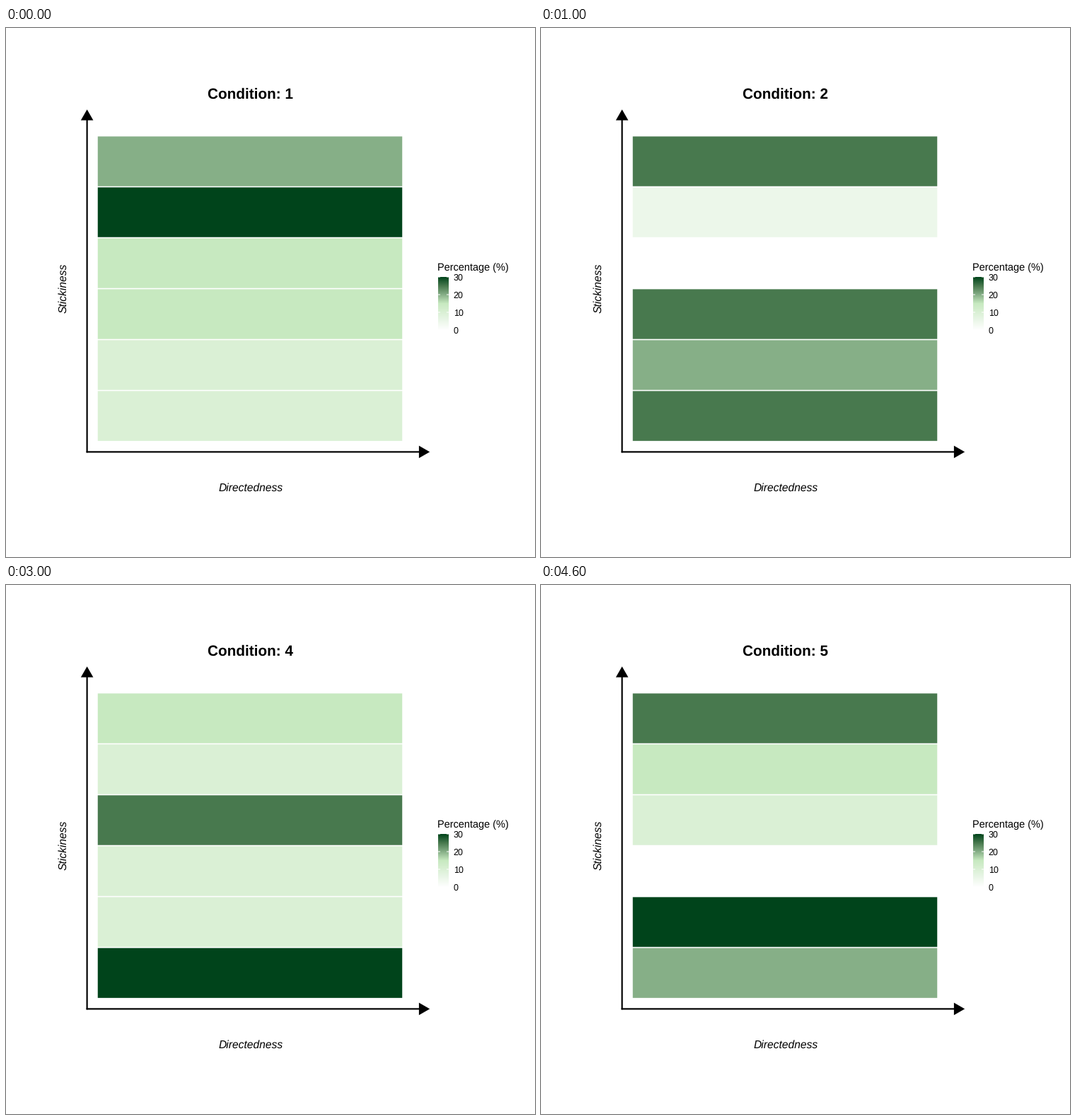
Write a matplotlib script that moves like this. It is 748 px wide and 748 px high and loops after 5000 ms.

```python
import matplotlib.pyplot as plt
import numpy as np
from matplotlib.animation import FuncAnimation
from matplotlib.colors import LinearSegmentedColormap
from matplotlib.patches import Polygon, Rectangle

SIZE, DPI = 748, 100
PX = 72 / DPI  # points per pixel

# Percentage per stickiness level, top to bottom, one row per condition
CONDITIONS = [
    [20, 30, 15, 15, 10, 10],
    [25, 5, 0, 25, 20, 25],
    [20, 0, 15, 15, 20, 30],
    [15, 10, 25, 10, 10, 30],
    [25, 15, 10, 0, 30, 20],
]
GREENS = LinearSegmentedColormap.from_list(
    "greens",
    ["#ffffff", "#ecf7ea", "#daf0d5", "#c7e9c0", "#86af87", "#48794e", "#00441b"],
    N=601,
)
LEFT, TOP, WIDTH, STEP = 129, 152.6, 432, 72

plt.rcParams["font.family"] = "Liberation Sans"
plt.rcParams["text.hinting"] = "none"

fig = plt.figure(figsize=(SIZE / DPI, SIZE / DPI), dpi=DPI, facecolor="white")
ax = fig.add_axes([0, 0, 1, 1])
ax.set(xlim=(0, SIZE), ylim=(SIZE, 0))
ax.axis("off")


def label(x, y, text, size, **kw):
    return ax.text(x, y, text, fontsize=size * PX, va="baseline", **kw)


def line(xs, ys, width, color="black"):
    ax.plot(xs, ys, color=color, lw=width * PX, solid_capstyle="butt", snap=False)


def arrow_head(tip, direction, length=15.3, half=8.8):
    tip, d = np.array(tip), np.array(direction)
    base = tip - length * d
    side = half * d[::-1]
    ax.add_patch(Polygon([tip, base + side, base - side], fc="black", lw=0))


# Heatmap tiles
tiles = [
    ax.add_patch(Rectangle((LEFT, TOP + i * STEP), WIDTH, STEP,
                           ec="white", lw=1.5 * PX, snap=False))
    for i in range(6)
]

# Axes
ox, oy = 114.6, 599.4
line([ox, ox], [oy + 1, 125], 2.2)
line([ox - 1, 590], [oy, oy], 2.2)
arrow_head((ox, 115.2), (0, -1))
arrow_head((599.2, oy), (1, 0))
label(346.3, 655, "Directedness", 15.6, ha="center", style="italic")
label(88.5, 368, "Stickiness", 15.6, ha="right", style="italic",
      rotation=90).set(ha="right", va="center")

# Legend
x0, x1, y0, y1 = 611, 626, 352, 427
label(610.3, 343.3, "Percentage (%)", 14.5)
ramp = np.linspace(30, 0, 300)[:, None]
ax.imshow(ramp, cmap=GREENS, vmin=0, vmax=30, extent=(x0, x1, y1, y0),
          aspect="auto", interpolation="bilinear")
ax.set(xlim=(0, SIZE), ylim=(SIZE, 0))
for value in (30, 20, 10, 0):
    y = y1 - (y1 - y0) * value / 30
    line([x0, x0 + 3], [y, y], 1, "white")
    line([x1 - 3, x1], [y, y], 1, "white")
    label(632.6, y + 4.4, str(value), 12.5)

title = label(345.2, 99.4, "", 20.8, ha="center", weight="bold")


def draw(frame):
    title.set_text(f"Condition: {frame + 1}")
    for tile, value in zip(tiles, CONDITIONS[frame]):
        tile.set_facecolor(GREENS(value / 30))
    return [title, *tiles]


anim = FuncAnimation(fig, draw, frames=len(CONDITIONS), interval=1000, repeat=True)
plt.show()
```
